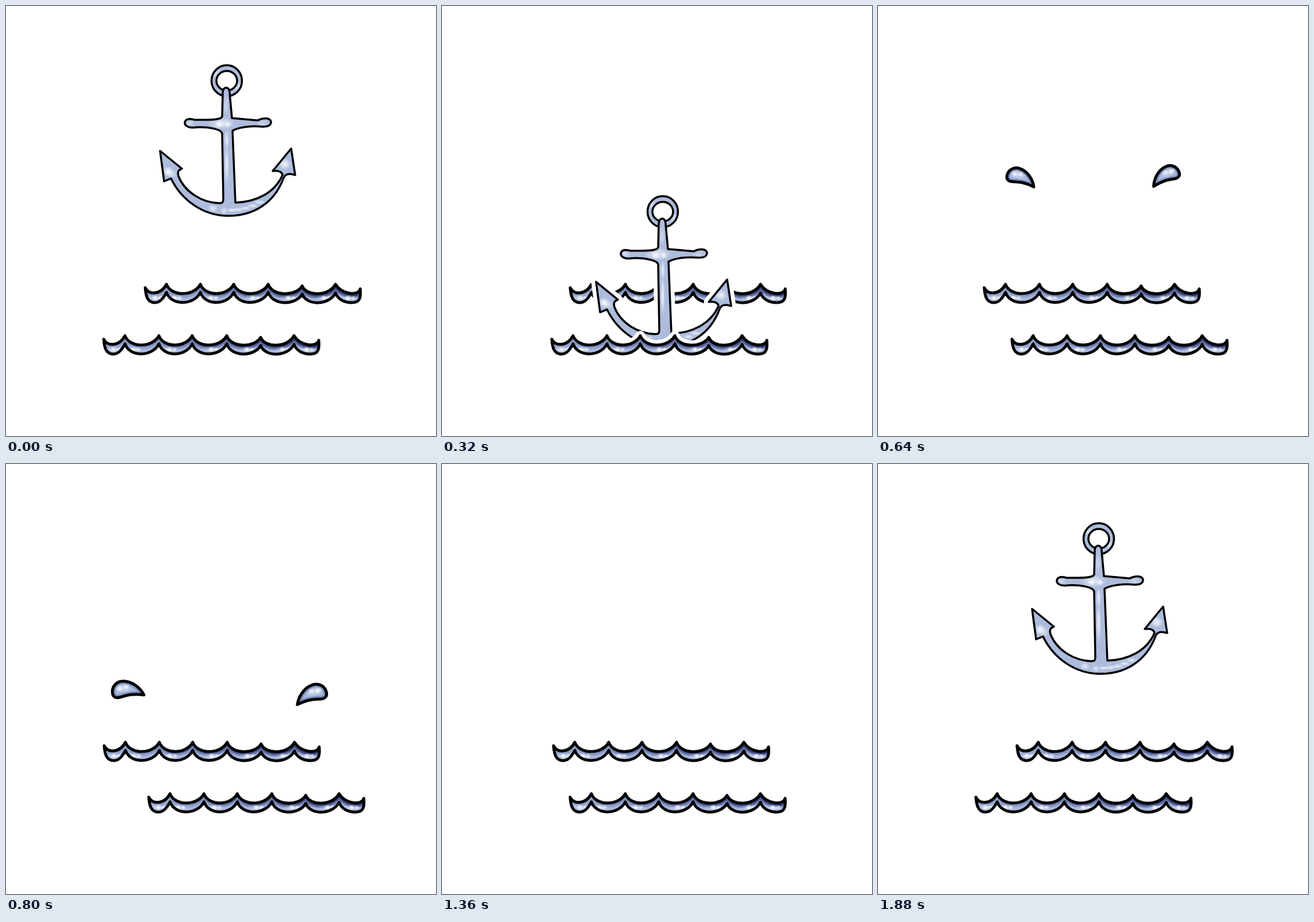
An HTML page with a canvas that plays this animation: 748 by 748 pixels, repeating every 1.92 s.

```html
<!DOCTYPE html>
<html lang="en">
<head>
<meta charset="utf-8">
<title>Anchor drop</title>
<style>
html, body { margin: 0; width: 100%; height: 100%; overflow: hidden; background: #fff; }
canvas { display: block; }
</style>
</head>
<body>
<canvas id="stage" width="748" height="748"></canvas>
<script>
const ctx = document.getElementById('stage').getContext('2d');
const LOOP = 1920, STEP = 40, MID = 384;
const BLUE = '#adbcdc', WATER = '#a8b8dc';

// Wave outline in its own space: left tip at x = 1
const crests = [[38, 484], [97, 484], [155, 484], [215, 484], [274, 487], [332, 484]];
const topLine = (() => {
  let d = 'M1 490 C6 503 28 503 38 484';
  for (let i = 1; i < crests.length; i++) {
    const a = crests[i - 1][0], [b, yb] = crests[i];
    d += ` C${a + 8} 506 ${b - 11} 505 ${b} ${yb}`;
  }
  return d + ' C343 502 372 505 375 492';
})();
const bottomLine = (() => {
  let d = ' C377 511 372 516 360 516 C347 516 336 510 332 499';
  for (let i = crests.length - 1; i > 0; i--) {
    const b = crests[i][0], [a, ya] = crests[i - 1];
    d += ` C${b - 11} 521 ${a + 8} 522 ${a} ${ya + 14}`;
  }
  return d + ' C33 508 27 516 18 516 C5 516 2 505 1 490 Z';
})();
const waveTop = new Path2D(topLine);
const waveBody = new Path2D(topLine + bottomLine);
const waveMask = new Path2D(topLine + ' V760 H1 Z');

const shank = new Path2D(
  'M377 151 C377 139 389 139 389 151 L393 195 L438 199 C447 194 459 194 461 201 ' +
  'C461 208 456 210 447 210 C425 208 404 211 394 217 L399 342 ' +
  'C434 341 467 326 481 294 C480 288 473 286 464 287 L496 248 L503 294 ' +
  'C494 291 486 291 483 299 C466 345 428 365 387 365 C342 365 305 337 287 300 ' +
  'L275 305 L268 252 L306 283 C300 285 298 288 300 296 ' +
  'C311 324 341 342 371 343 C377 343 378 341 378 336 L376 222 ' +
  'C375 214 352 210 330 211 C319 213 311 209 311 203 C312 195 321 196 328 198 ' +
  'C349 198 375 199 376 192 Z');
const dropBody = new Path2D(
  'M28 10 C22 -2 8 -14 -8 -14 C-20 -14 -27 -5 -27 4 ' +
  'C-27 14 -21 16 -13 14 C-3 11 8 7 28 10 Z');

function line(path, color, width) {
  ctx.strokeStyle = color;
  ctx.lineWidth = width;
  ctx.stroke(path);
}

function glow(x, y, rx, ry, alpha) {
  ctx.save();
  ctx.translate(x, y);
  ctx.scale(rx, ry);
  const g = ctx.createRadialGradient(0, 0, 0, 0, 0, 1);
  g.addColorStop(0, `rgba(255,255,255,${alpha})`);
  g.addColorStop(.45, `rgba(255,255,255,${alpha * .65})`);
  g.addColorStop(1, 'rgba(255,255,255,0)');
  ctx.fillStyle = g;
  ctx.fillRect(-1, -1, 2, 2);
  ctx.restore();
}

function wave(x, y, masking) {
  ctx.save();
  ctx.translate(x, y);
  if (masking) {
    ctx.fillStyle = '#fff';
    ctx.fill(waveMask);
    line(waveTop, '#fff', 17);
  }
  ctx.save();
  ctx.clip(waveBody);
  ctx.fillStyle = WATER;
  ctx.fillRect(-5, 475, 390, 50);
  const shade = ctx.createLinearGradient(0, 0, 376, 0);
  shade.addColorStop(0, 'rgba(30,44,110,.03)');
  shade.addColorStop(.4, 'rgba(28,40,110,.16)');
  shade.addColorStop(1, 'rgba(14,20,85,.34)');
  for (const w of [17, 13, 10, 8]) line(waveTop, shade, w);
  for (const gx of [18, 52, 115, 188, 250, 312, 354]) {
    glow(gx, 508, 6, 5, .9);
    glow(gx + 9, 508, 5, 4, .7);
    glow(gx + 1, 508, 17, 5, .4);
  }
  ctx.restore();
  line(waveBody, '#000', 5);
  ctx.restore();
}

function ellipse(x, y, rx, ry) {
  const p = new Path2D();
  p.ellipse(x, y, rx, ry, 0, 0, 7);
  return p;
}
const outer = ellipse(384, 130, 26.5, 27), inner = ellipse(384, 130, 18, 17);

function anchor(y) {
  ctx.save();
  ctx.translate(0, y);
  ctx.fillStyle = '#fff';
  for (const p of [outer, shank]) {
    ctx.fill(p);
    line(p, '#fff', 17);
  }
  ctx.fillStyle = BLUE;
  ctx.fill(outer);
  glow(365, 117, 9, 9, .5);
  glow(404, 141, 9, 9, .5);
  ctx.fillStyle = '#fff';
  ctx.fill(inner);
  line(outer, '#000', 3.5);
  line(inner, '#000', 3.5);

  ctx.fillStyle = BLUE;
  ctx.fill(shank);
  ctx.save();
  ctx.clip(shank);
  glow(375, 204, 24, 11, .65);
  glow(371, 206, 7, 6, .8);
  glow(386, 206, 6, 6, .7);
  glow(319, 204, 9, 6, .5);
  glow(446, 204, 12, 6, .35);
  glow(383, 172, 5, 18, .4);
  glow(384, 232, 4, 18, .75);
  glow(384, 276, 4, 36, .8);
  glow(282, 288, 9, 9, .95);
  glow(289, 292, 9, 8, .5);
  glow(485, 275, 11, 10, .8);
  glow(360, 352, 9, 7, .65);
  glow(379, 356, 7, 6, .6);
  for (let i = 0; i < 5; i++) glow(393 + i * 12, 355 - i * i * .85, 10, 4, .7);
  ctx.restore();
  line(shank, '#000', 3.5);
  ctx.restore();
}

function drop(side, t, o) {
  const u = (t - 480) / 320;
  const dx = o.start + (u > 0 ? o.spread * u ** o.curve : 0);
  const v = t - 586;
  const y = o.apex + (v < 0 ? .00205 * v * v : o.fall * Math.sin(v / 514 * Math.PI / 2) ** 2);
  const size = ((t - 330) / 470) ** .195;
  ctx.save();
  ctx.globalAlpha = Math.min(1, (1120 - t) / 120);
  ctx.translate(MID + side * dx, y);
  ctx.scale(-side * size, size);
  ctx.rotate((o.turn + o.spin * u) * Math.PI / 180);
  ctx.save();
  ctx.clip(dropBody);
  ctx.fillStyle = WATER;
  ctx.fillRect(-30, -20, 62, 40);
  for (const w of [12, 10, 8]) line(dropBody, 'rgba(40,55,125,.16)', w);
  glow(-7, -2, 17, 9, .4);
  glow(-14, -1, 7, 6, .8);
  glow(-3, -4, 6, 5, .8);
  ctx.restore();
  line(dropBody, '#000', 5 / size);
  ctx.restore();
}

const leftDrop = { start: 113, spread: 59, curve: 1.47, apex: 290, fall: 275, turn: 39, spin: -39 };
const rightDrop = { start: 107, spread: 39, curve: 2.3, apex: 286, fall: 308, turn: 32, spin: -13 };

function draw(t) {
  const sway = (1 - Math.cos(t / LOOP * 2 * Math.PI)) / 2;
  ctx.fillStyle = '#fff';
  ctx.fillRect(0, 0, 748, 748);
  ctx.lineJoin = ctx.lineCap = 'round';
  wave(241.2 - 76.5 * sway, 0, false);
  if (t < 640) anchor(468 * Math.sin(t / 651 * Math.PI / 2) ** 2);
  else if (t >= 1640) anchor(0);
  wave(169 + 84 * sway, 89.5, true);
  if (t > 340 && t < 1120) {
    drop(-1, t, leftDrop);
    drop(1, t, rightDrop);
  }
}

const begin = performance.now();
function tick() {
  const t = (performance.now() - begin) % LOOP;
  draw(Math.floor(t / STEP) * STEP);
  requestAnimationFrame(tick);
}
tick();
</script>
</body>
</html>
```
